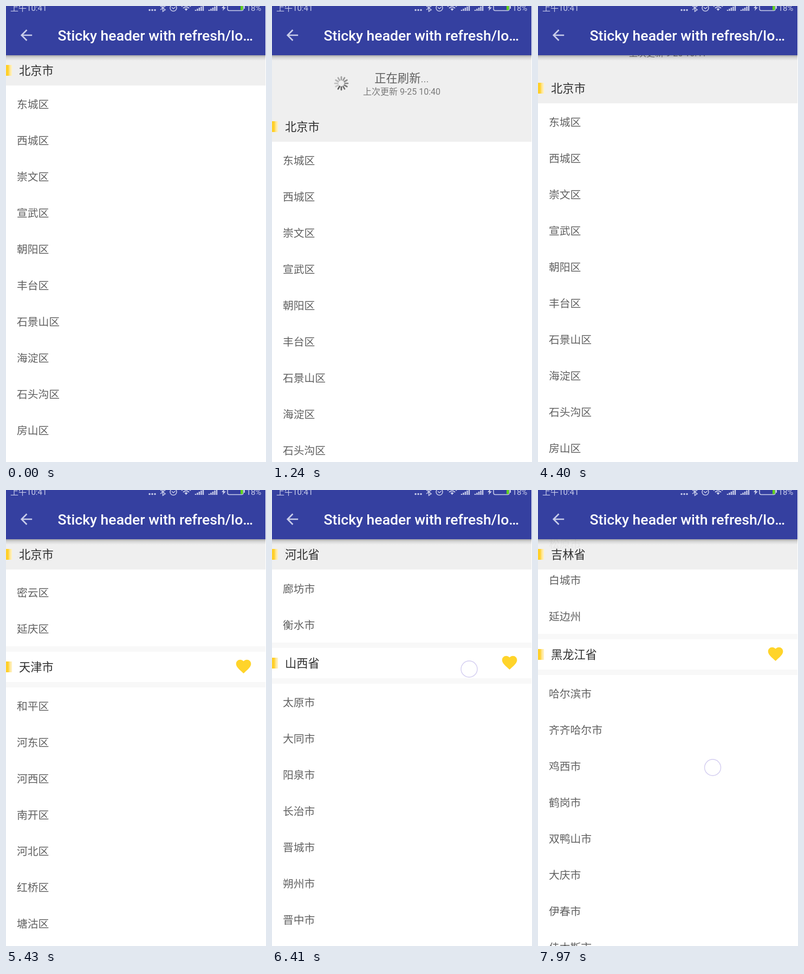
An HTML page that plays this animation: 480 by 843 pixels, repeating every 8 s.

```html
<!DOCTYPE html>
<html lang="zh-CN">
<head>
<meta charset="utf-8">
<title>Sticky header list</title>
<style>
  html, body { margin: 0; width: 100%; height: 100%; overflow: hidden; background: #fff; }
  svg { display: block; width: 100%; height: 100%; }
  text { font-family: Roboto, "Noto Sans CJK SC", "Noto Sans CJK", sans-serif; white-space: pre; }
  .item { font-size: 19.8px; font-weight: 350; fill: #606060; }
  .head { font-size: 21.2px; fill: #2e2e2e; }
  .state { font-size: 21.3px; font-weight: 350; fill: #606060; text-anchor: middle; }
  .date { font-size: 16px; fill: #7a7a7a; text-anchor: middle; }
  .title { font-size: 26.6px; font-weight: 500; fill: #fff; }
  .status { font-size: 15px; fill: #c9cdea; }
</style>
</head>
<body>
<svg id="stage" viewBox="0 0 480 843" preserveAspectRatio="none">
  <defs>
    <linearGradient id="shade" x1="0" y1="0" x2="0" y2="1">
      <stop offset="0" stop-color="#000" stop-opacity=".3"/>
      <stop offset=".4" stop-color="#000" stop-opacity=".11"/>
      <stop offset="1" stop-color="#000" stop-opacity="0"/>
    </linearGradient>
    <g id="tag">
      <rect y="18" width="5" height="20" fill="#ffd02b"/>
      <rect x="5" y="18" width="3" height="20" fill="#ffe27c"/>
      <rect x="8" y="18" width="3" height="20" fill="#ffefb8"/>
    </g>
    <path id="heart" fill="#ffd42a" transform="translate(422 10.600) scale(1.38)"
      d="M12 21.35l-1.45-1.32C5.4 15.36 2 12.28 2 8.5 2 5.42 4.42 3 7.5 3c1.74 0 3.41.81 4.5 2.09C13.09 3.81 14.76 3 16.5 3 19.58 3 22 5.42 22 8.5c0 3.78-3.4 6.86-8.55 11.54L12 21.35z"/>
    <path id="bars" d="M1 9V7M4.5 9V5M8 9V3M11.5 9V1M15 9V-2" stroke="#c9cdea" stroke-width="2.4"/>
  </defs>

  <rect width="480" height="843" fill="#fff"/>
  <g id="list"></g>

  <rect id="pullBack" y="91" width="479" fill="#efefef"/>
  <g id="refresh">
    <g id="spinner"></g>
    <path id="arrow" d="M0-12V11M-9 2L0 11L9 2" fill="none" stroke="#666" stroke-width="2.6"/>
    <text id="state" class="state" x="239.5" y="50"></text>
    <text id="date" class="date" x="239.5" y="73"></text>
  </g>

  <g id="sticky">
    <rect width="479" height="56" fill="#eee" fill-opacity=".94"/>
    <use href="#tag"/>
    <text id="stickyName" class="head" x="24" y="36"></text>
  </g>

  <rect y="91" width="479" height="10" fill="url(#shade)"/>
  <rect width="479" height="91" fill="#3540a0"/>
  <path transform="translate(21.5 38) scale(1.3333)" fill="#c9cdea"
    d="M20 11H7.83l5.59-5.59L12 4l-8 8 8 8 1.41-1.41L7.83 13H20v-2z"/>
  <text class="title" x="95.5" y="64">Sticky header with refresh/lo…</text>

  <text class="status" x="8" y="9">上午10:41</text>
  <text class="status" x="443.5" y="9">18%</text>
  <g fill="none" stroke="#c9cdea" stroke-width="1.5">
    <path d="M265 7.5h.1M270 7.5h.1M275 7.5h.1" stroke-width="3.4" stroke-linecap="round"/>
    <path d="M285 0L294 7L289.5 10V-4L294 0L285 7"/>
    <circle cx="309" cy="3.5" r="6"/>
    <path d="M306 2.5L309 5L312.5 2"/>
    <path d="M324 1Q332.500-6 341 1M327 4Q332.500-1 338 4" stroke-width="2"/>
    <path d="M329.500 5.500Q332.500 3 335.500 5.500L332.500 9Z" fill="#c9cdea" stroke="none"/>
    <path d="M403-2L398 4H401L400 9L406 2.500H402.500Z" fill="#c9cdea" stroke="none"/>
    <rect x="409" y="-4" width="29" height="12.500" rx="3"/>
    <path d="M440 0V5" stroke-width="2"/>
    <rect x="433" y="-3" width="4.500" height="10.500" fill="#5fd21c" stroke="none"/>
  </g>
  <use href="#bars" x="349"/>
  <use href="#bars" x="374"/>

  <circle id="touch" r="15" fill="#fff" fill-opacity=".65" stroke="#d3cdf0" stroke-width="1.4"/>
</svg>

<script>
const LOOP = 8000, TOP = 91, HEAD = 56, ROW = 67, BAND = 10, PULL = 104;
const $ = id => document.getElementById(id);

const regions = [
  ["北京市", "东城区 西城区 崇文区 宣武区 朝阳区 丰台区 石景山区 海淀区 石头沟区 房山区 通州区 顺义区 昌平区 大兴区 怀柔区 平谷区 密云区 延庆区"],
  ["天津市", "和平区 河东区 河西区 南开区 河北区 红桥区 塘沽区 汉沽区 大港区 东丽区 西青区 津南区 北辰区 武清区 宝坻区 宁河区 静海区 蓟州区"],
  ["河北省", "石家庄市 唐山市 秦皇岛市 邯郸市 邢台市 保定市 张家口市 承德市 沧州市 廊坊市 衡水市"],
  ["山西省", "太原市 大同市 阳泉市 长治市 晋城市 朔州市 晋中市 运城市 忻州市 临汾市 吕梁市"],
  ["内蒙古自治区", "呼和浩特市 包头市 乌海市 赤峰市 通辽市 鄂尔多斯市 呼伦贝尔市 巴彦淖尔市 乌兰察布市 兴安盟 锡林郭勒市 阿拉善盟"],
  ["辽宁省", "沈阳市 大连市 鞍山市 抚顺市 本溪市 丹东市 锦州市 营口市 阜新市 辽阳市 盘锦市 铁岭市 朝阳市 葫芦岛市"],
  ["吉林省", "长春市 吉林市 四平市 辽源市 通化市 白山市 松原市 白城市 延边州"],
  ["黑龙江省", "哈尔滨市 齐齐哈尔市 鸡西市 鹤岗市 双鸭山市 大庆市 伊春市 佳木斯市 七台河市 牡丹江市 黑河市 绥化市"]
];

// Lay the list out once; each section remembers the top of its header.
let y = TOP, markup = "";
const sections = regions.map(([name, rows], i) => {
  if (i) {
    markup += `<rect y="${y}" width="479" height="${HEAD + 2 * BAND}" fill="#f8f8f8"/>`;
    y += BAND;
    markup += `<g transform="translate(0 ${y})"><rect width="480" height="${HEAD}" fill="#fff"/>
      <use href="#tag"/><use href="#heart"/><text class="head" x="24" y="36">${name}</text></g>`;
  }
  const top = y;
  y += HEAD + (i ? BAND : 0);
  for (const row of rows.split(" ")) {
    markup += `<text class="item" x="20" y="${y + 42}">${row}</text>`;
    y += ROW;
  }
  return { name, top };
});
$("list").innerHTML = markup;

$("spinner").innerHTML = Array.from({ length: 12 }, (_, i) =>
  `<path d="M0-6.500V-12" stroke="#5c5c5c" stroke-width="2.700" stroke-linecap="round"
    opacity="${(i + 4) / 15}" transform="rotate(${30 * (i + 1)})"/>`).join("");

// Monotone cubic curve through [time, value] points.
function curve(points) {
  const slope = points.slice(1).map((p, i) => (p[1] - points[i][1]) / (p[0] - points[i][0]));
  const tangent = points.map((_, i) => {
    const a = slope[i - 1] || 0, b = slope[i] || 0;
    return a * b > 0 ? 2 * a * b / (a + b) : 0;
  });
  return t => {
    const last = points.length - 1;
    if (t <= points[0][0]) return points[0][1];
    if (t >= points[last][0]) return points[last][1];
    const i = points.findIndex(p => p[0] > t) - 1;
    const [t0, v0] = points[i], [t1, v1] = points[i + 1];
    const h = t1 - t0, u = (t - t0) / h, w = 1 - u;
    return w * w * (1 + 2 * u) * v0 + u * u * (3 - 2 * u) * v1
      + h * u * w * (w * tangent[i] - u * tangent[i + 1]);
  };
}

const pullAt = curve([[300, 0], [420, 40], [600, 122], [800, 185], [880, 188],
  [1000, 125], [1150, PULL], [4190, PULL], [4330, 52], [4500, 14], [4720, 0]]);
const scrollAt = curve([[4900, 0], [5130, 320], [5430, 1064], [5720, 1480], [5850, 1690],
  [6130, 2480], [6410, 3166], [6600, 3560], [6900, 4310], [7190, 4741],
  [7330, 4741], [7650, 5720], [7970, 6568], [8000, 6568]]);

// A finger follows the content, passing through (x, y) at time `at`.
const touches = [
  { from: 310, to: 880, x: 300, y: 330, at: 310 },
  { from: 4900, to: 5110, x: 345, y: 560, at: 4900 },
  { from: 5740, to: 5900, x: 350, y: 540, at: 5740 },
  { from: 6340, to: 6500, x: 364, y: 331, at: 6410 },
  { from: 7335, to: 7470, x: 335, y: 540, at: 7335 },
  { from: 7930, to: 8000, x: 322.5, y: 513, at: 7970 }
];

function drawRefresh(t, pull) {
  const busy = t >= 900 && t < 3930, done = t >= 3930;
  $("pullBack").setAttribute("height", pull);
  $("refresh").style.display = pull > 0 ? "" : "none";
  $("refresh").setAttribute("transform", `translate(0 ${TOP + pull - PULL})`);
  $("state").textContent = done ? "刷新完成" : busy ? "正在刷新..."
    : pull < PULL ? "下拉可以刷新" : "释放立即刷新";
  $("date").textContent = `上次更新 9-25 10:${done ? 41 : 40}`;

  const turn = 210 + 30 * Math.floor((Math.min(t, 3730) - 1240) / (1000 / 12));
  $("spinner").style.display = busy ? "" : "none";
  $("spinner").setAttribute("transform", `translate(128 52) rotate(${turn})`);

  const flip = Math.max(0, Math.min(1, (t - 555) / 200)) * 180;
  $("arrow").style.display = busy || done ? "none" : "";
  $("arrow").setAttribute("transform", `translate(128 52) rotate(${flip})`);
}

function drawSticky(pull, scroll) {
  let i = 0;
  while (sections[i + 1] && sections[i + 1].top - scroll <= TOP) i++;
  const next = sections[i + 1];
  const limit = next ? next.top - scroll - HEAD : TOP;
  $("sticky").setAttribute("transform", `translate(0 ${Math.min(TOP + pull, limit)})`);
  $("stickyName").textContent = sections[i].name;
}

function drawTouch(t, pull, scroll) {
  const touch = touches.find(p => t >= p.from && t < p.to);
  $("touch").style.display = touch ? "" : "none";
  if (!touch) return;
  const dy = 2 * (pull - pullAt(touch.at)) - (scroll - scrollAt(touch.at));
  $("touch").setAttribute("cx", touch.x);
  $("touch").setAttribute("cy", touch.y + dy);
}

function draw(t) {
  const pull = pullAt(t), scroll = scrollAt(t);
  $("list").setAttribute("transform", `translate(0 ${pull - scroll})`);
  drawRefresh(t, pull);
  drawSticky(pull, scroll);
  drawTouch(t, pull, scroll);
}

let start;
function tick(now) {
  start ??= now;
  draw((now - start) % LOOP);
  requestAnimationFrame(tick);
}
draw(0);
requestAnimationFrame(tick);
</script>
</body>
</html>
```
